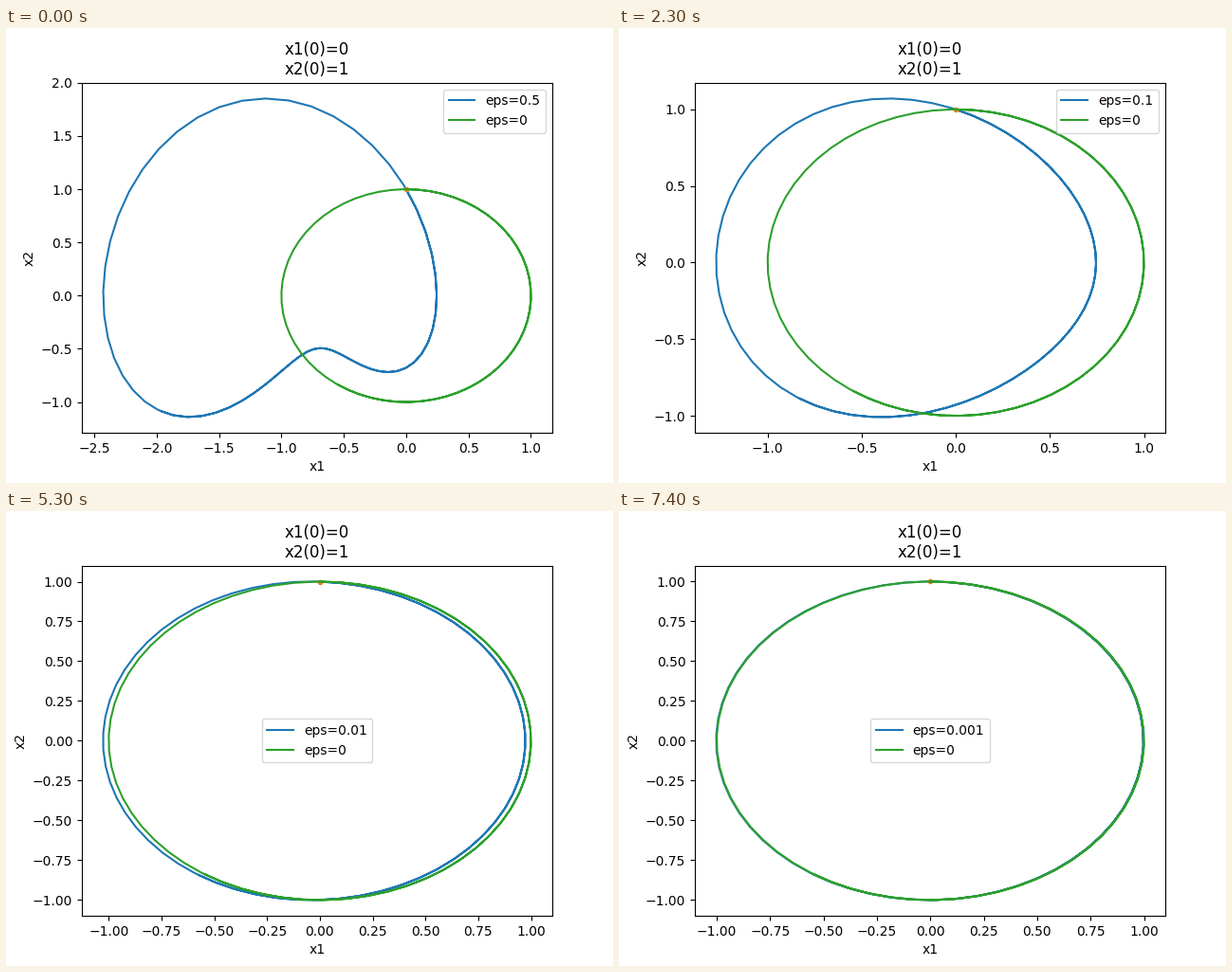
These frames come from a looping animation (640 by 480 pixels, 8 s). A matplotlib script:

```python
import matplotlib.pyplot as plt
import numpy as np
from matplotlib.animation import FuncAnimation

STEP_MS = 500
LOOP_MS = 8000
STARTS = [(0, 0.5), (500, 0.1), (3500, 0.01), (6500, 0.001)]  # (ms, eps)

t = np.linspace(0, 10, 100)
fig, ax = plt.subplots(figsize=(6.4, 4.8), dpi=100)


def solve(eps):
    """Solution of x'' + x = -4 eps cos(t)^2 with x(0) = 0, x'(0) = 1."""
    x1 = np.sin(t) + eps * (-2 + 2 / 3 * np.cos(2 * t) + 4 / 3 * np.cos(t))
    x2 = np.cos(t) - eps * 4 / 3 * (np.sin(2 * t) + np.sin(t))
    return x1, x2


def draw(frame):
    now = frame * STEP_MS
    eps = [e for start, e in STARTS if start <= now][-1]
    ax.clear()
    ax.plot(*solve(eps), color="C0", label=f"eps={eps}")
    ax.plot(0, 1, ".", color="C1")
    ax.plot(*solve(0), color="C2", label="eps=0")
    ax.set_title("x1(0)=0\nx2(0)=1")
    ax.set_xlabel("x1")
    ax.set_ylabel("x2")
    ax.legend(loc="best")
    return ax.get_children()


anim = FuncAnimation(fig, draw, frames=LOOP_MS // STEP_MS, interval=STEP_MS,
                     repeat=True, repeat_delay=0)
plt.show()
```
